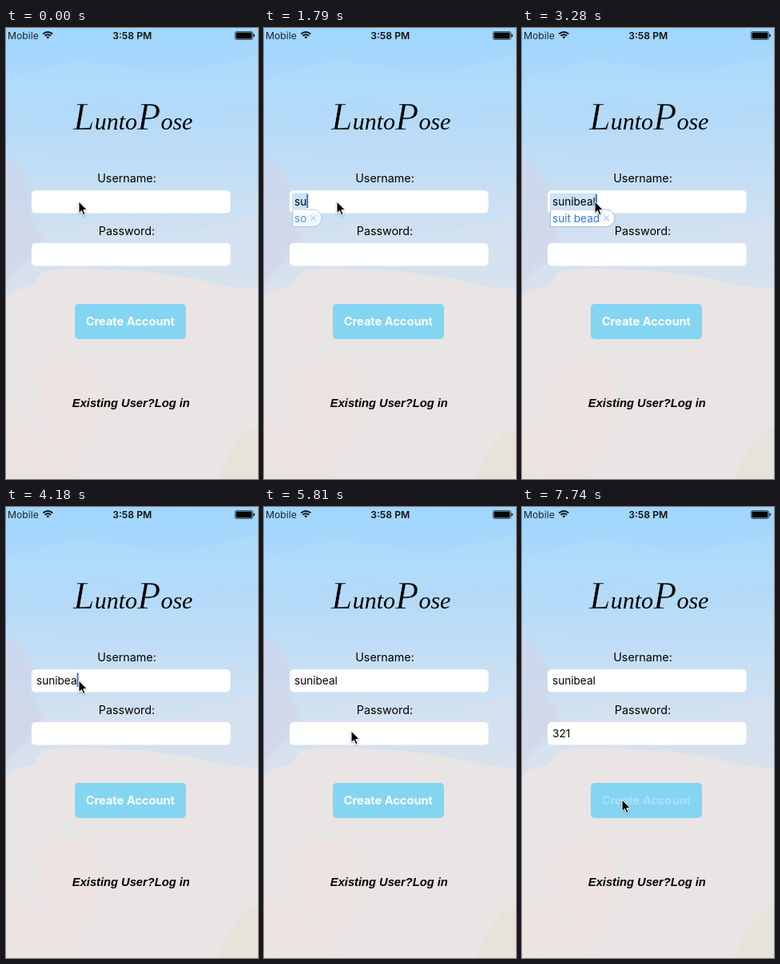
These frames come from a looping animation (315x564 px, 8 s). An HTML page:

```html
<!DOCTYPE html>
<html lang="en">
<head>
<meta charset="utf-8">
<title>Sign up</title>
<style>
html, body { margin: 0; width: 100%; height: 100%; overflow: hidden; }
svg { display: block; width: 100vw; height: 100vh; }
text { font-family: Inter, Roboto, sans-serif; white-space: pre; }
.mid { text-anchor: middle; }
.label { font-size: 14.3px; }
.entry { font-size: 13.6px; }
.logo { font-family: "Liberation Serif", serif; font-style: italic; font-size: 30px; }
.logo .cap { font-size: 48px; stroke: #b9dcf8; stroke-width: .7px; }
.link { font: italic bold 14.7px "Liberation Sans", sans-serif; }
</style>
</head>
<body>
<svg viewBox="0 0 315 564" preserveAspectRatio="none">
  <defs>
    <linearGradient id="sky" x1="0" y1="0" x2="0" y2="335" gradientUnits="userSpaceOnUse">
      <stop offset="0" stop-color="#a0d6fe"/>
      <stop offset=".3" stop-color="#b1daf9"/>
      <stop offset=".6" stop-color="#c7dff4"/>
      <stop offset="1" stop-color="#d9e2ec"/>
    </linearGradient>
    <filter id="soft" x="-20%" y="-20%" width="140%" height="140%"><feGaussianBlur stdDeviation="2.5"/></filter>
    <filter id="shade" x="-50%" y="-50%" width="200%" height="200%"><feDropShadow dx="0" dy="1" stdDeviation=".8" flood-opacity=".35"/></filter>
  </defs>

  <rect width="315" height="564" fill="#e8e5e4"/>
  <path fill="url(#sky)" d="M0 0H315V326L290 325 262 320 236 313 205 309 170 304 128 302 92 300 62 301 44 306 34 322 12 328 0 336Z"/>
  <g filter="url(#soft)">
    <path fill="#d0d3e7" opacity=".6" d="M-8 158L14 170 34 204 30 236 48 262 30 290 12 306 -8 330Z"/>
    <path fill="#d9e1ef" opacity=".5" d="M40 262L120 244 200 262 320 232V300L210 292 130 300 58 300Z"/>
    <path fill="#c3e3fb" opacity=".2" d="M-8 66L90 40 210 58 320 34V92L220 104 120 86 -8 118Z"/>
    <path fill="#bcdcf8" opacity=".3" d="M60 156L160 128 320 112V176L230 168 130 184Z"/>
  </g>
  <path fill="#f0e3e0" opacity=".65" d="M42 462C40 432 62 417 86 419C112 422 121 452 115 482C109 510 94 530 78 546C60 520 46 490 42 462Z"/>
  <path fill="#eee2de" opacity=".5" d="M0 470C12 490 20 520 18 564H0ZM24 488C42 510 62 538 92 564H28C20 540 18 512 24 488Z"/>
  <path fill="#e8e2d9" opacity=".8" d="M315 498C296 506 276 528 266 564H315Z"/>

  <text x="2" y="14" font-size="12.2" fill="#1c242b">Mobile</text>
  <g fill="none" stroke="#111" stroke-width="1.9">
    <path d="M46.3 7.4Q52.3 2.6 58.3 7.4M48.4 9.8Q52.3 6.8 56.2 9.8"/>
    <path d="M50.2 11L52.3 13.4 54.4 11Q52.3 9.8 50.2 11Z" fill="#111" stroke="none"/>
  </g>
  <text class="mid" x="157.7" y="14" font-size="12.2" font-weight="600" fill="#111">3:58 PM</text>
  <rect x="286.3" y="4.5" width="22.2" height="10" rx="1.8" fill="none" stroke="#222" stroke-width=".7"/>
  <rect x="287.4" y="5.6" width="20" height="7.8" rx=".8" fill="#060606"/>
  <path d="M309.4 7.6Q311 7.8 311 9.5T309.4 11.4Z" fill="#060606"/>

  <text class="logo" x="84" y="127"><tspan class="cap">L</tspan>unto<tspan class="cap">P</tspan>ose</text>
  <text class="label mid" x="151" y="193">Username:</text>
  <text class="label mid" x="151" y="259">Password:</text>
  <rect x="32" y="203" width="248.5" height="28.5" rx="5" fill="#fff"/>
  <rect x="32" y="269" width="248.5" height="28.5" rx="5" fill="#fff"/>

  <rect id="mark" x="35" y="206.5" height="19.5" fill="#cce3fb"/>
  <text id="user" class="entry" x="38" y="221.5"></text>
  <rect id="userCaret" y="207.5" width="2" height="17.5" fill="#416fda"/>
  <text id="pass" class="entry" x="38" y="287.5"></text>
  <rect id="passCaret" y="273.5" width="2" height="17.5" fill="#416fda"/>

  <g id="hint">
    <path id="bubble" fill="#fff" stroke="#a9b3c4" stroke-width=".9"/>
    <text id="word" class="entry" x="38" y="242.5" fill="#2a7df0"></text>
    <path id="cross" d="M-3.3 -3.3L3.3 3.3M3.3 -3.3L-3.3 3.3" stroke="#a9c9ee" stroke-width="1.1"/>
  </g>

  <rect x="86" y="345" width="139" height="44" rx="5" fill="#84d5f2"/>
  <text id="button" class="mid" x="155.3" y="372" font-size="14.6" font-weight="700" fill="#fff">Create Account</text>
  <text class="link mid" x="156.3" y="474">Existing User?Log in</text>

  <path id="pointer" filter="url(#shade)" d="M0 0V14.6L3.4 11.5 5.7 16.8 8.1 15.8 5.8 10.6H10.4Z" fill="#060606" stroke="#fff" stroke-width="1"/>
</svg>
<script>
const LOOP = 8000;
const $ = id => document.getElementById(id);
const NAME = "sunibeal";
const typed = n => NAME.slice(0, n);

const start = {
  user: "", userCaret: 0, marked: "", hint: "", hintAlpha: 1,
  pass: "", passCaret: 0, at: [91, 217], label: 1
};

// Each step changes only the listed parts of the state.
const steps = [
  [450, { userCaret: 1 }],
  [1050, { userCaret: .5 }],
  [1200, { userCaret: 0 }],
  [1350, { user: typed(1), userCaret: 1 }],
  [1500, { user: typed(2) }],
  [1790, { marked: typed(2), hint: "so", hintAlpha: .75 }],
  [1940, { user: typed(3), marked: typed(3), hint: "", hintAlpha: 1 }],
  [2090, { user: typed(4), marked: typed(4), hint: "suit" }],
  [2530, { userCaret: .5 }],
  [2680, { user: typed(5), userCaret: 1 }],
  [2830, { user: typed(6), marked: typed(6), hint: "suit be" }],
  [2980, { user: typed(7), marked: typed(7), hint: "suit bean" }],
  [3130, { user: NAME, marked: NAME }],
  [3280, { hint: "suit bead" }],
  [3880, { userCaret: .5 }],
  [4030, { marked: "", hint: "", userCaret: 1 }],
  [4180, { user: typed(7) }],
  [4780, { userCaret: .5 }],
  [4930, { user: NAME, userCaret: 1 }],
  [5520, { at: [95, 232], userCaret: .5 }],
  [5660, { at: [106, 270], userCaret: 0 }],
  [5810, { at: [109, 280] }],
  [5960, { passCaret: .5 }],
  [6100, { passCaret: 1 }],
  [6700, { pass: "3" }],
  [6850, { pass: "32" }],
  [7000, { pass: "321" }],
  [7290, { at: [112, 303] }],
  [7440, { at: [121, 350] }],
  [7590, { at: [125, 366], passCaret: .5 }],
  [7740, { passCaret: 0, label: .3 }]
];

function set(id, attrs) {
  for (const key in attrs) $(id).setAttribute(key, attrs[key]);
}

// Writes the text and returns its width.
function write(id, value) {
  const el = $(id);
  el.textContent = value;
  return value ? el.getComputedTextLength() : 0;
}

function draw(time) {
  const s = Object.assign({}, start);
  for (const [at, change] of steps) if (at <= time) Object.assign(s, change);

  const markWidth = write("user", s.marked);
  const userWidth = write("user", s.user);
  const passWidth = write("pass", s.pass);
  set("mark", { width: s.marked ? markWidth + 3.5 : 0 });
  set("userCaret", { x: 38 + userWidth, opacity: s.userCaret });
  set("passCaret", { x: 38 + passWidth, opacity: s.passCaret });

  const end = 38 + write("word", s.hint);
  set("hint", { opacity: s.hint ? s.hintAlpha : 0 });
  set("bubble", { d: `M35.5 227H${end + 9}a10.8 10.8 0 0 1 0 21.5H35.5Z` });
  set("cross", { transform: `translate(${end + 8.3} 237.7)` });

  set("button", { opacity: s.label });
  set("pointer", { transform: `translate(${s.at})` });
}

const began = performance.now();
function tick() {
  draw((performance.now() - began) % LOOP);
  requestAnimationFrame(tick);
}
tick();
</script>
</body>
</html>
```
